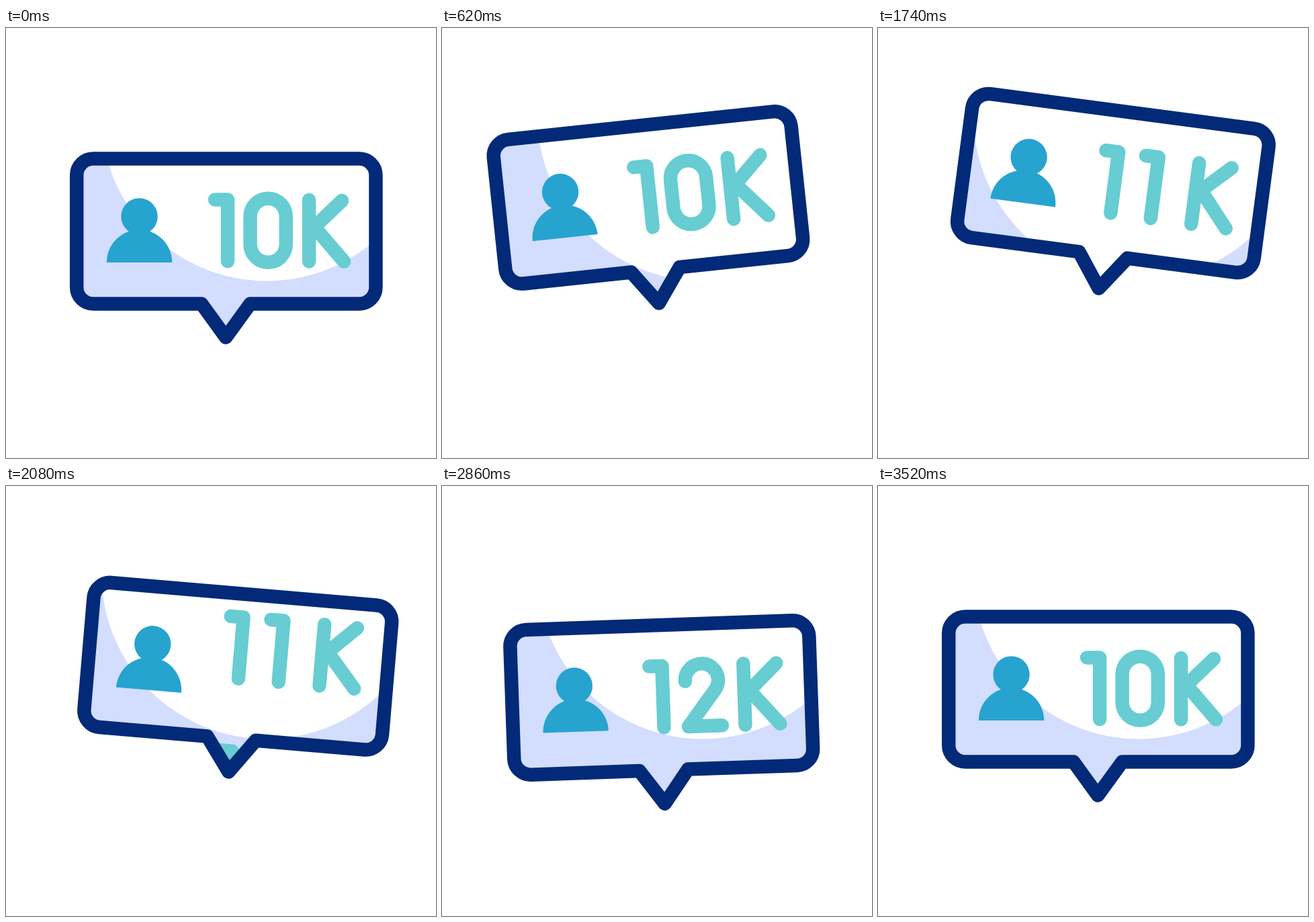
Write an HTML page with a canvas that moves like this. It is 640 px wide and 640 px high and loops after 3.6 s.

```html
<!DOCTYPE html>
<html lang="en">
<head>
<meta charset="utf-8">
<title>Follower counter</title>
<style>
  html, body { margin: 0; width: 100%; height: 100%; overflow: hidden; background: #fff; }
  canvas { display: block; width: 640px; height: 640px; }
</style>
</head>
<body>
<canvas id="stage" width="640" height="640"></canvas>
<script>
const ctx = document.getElementById('stage').getContext('2d');
const LOOP = 3600;
const STROKE = 20.5;
const NAVY = '#032a78', LAVENDER = '#d3ddfd', BLUE = '#27a3d0', TEAL = '#67cdd2';
const CENTER = { x: 328, y: 302.5 };
const ROW_HEIGHT = 200;

// time, x offset, y offset, tilt in degrees
const POSES = [
  [60, 0, 0, 0],
  [300, -3.5, -7.5, -1.1],
  [560, -18.2, -41.5, -5.3],
  [620, -20.8, -50, -6],
  [820, -32.4, -74.4, -8],
  [1100, -15, -74, -3.8],
  [1160, -11.5, -73.8, -2.7],
  [1640, 15.5, -71.5, 6.3],
  [1740, 22, -71.5, 7.5],
  [1860, 27.4, -67, 8],
  [2180, 12, -17, 2.8],
  [2380, 5, 12.7, -1.4],
  [2565, -2, 38.3, -4.5],
  [2720, -2, 23.5, -3.1],
  [2860, -1, 12.5, -2],
  [3030, -0.3, 3.5, -0.7],
  [3260, 0, 0, 0]
];

// start and end of each roll to the next number
const ROLLS = [[920, 1560], [1936, 2576], [2930, 3490]];
const ROWS = ['10', '11', '12', '10'];

const smooth = u => {
  u = Math.min(1, Math.max(0, u));
  return u * u * (3 - 2 * u);
};

function slope(i, k) {
  const a = POSES[i - 1], b = POSES[i], c = POSES[i + 1];
  if (!a || !c) return 0;
  const before = (b[k] - a[k]) / (b[0] - a[0]);
  const after = (c[k] - b[k]) / (c[0] - b[0]);
  return before * after > 0 ? 2 * before * after / (before + after) : 0;
}

function poseValue(t, k) {
  const last = POSES.length - 1;
  if (t <= POSES[0][0] || t >= POSES[last][0]) return 0;
  const i = POSES.findIndex(p => p[0] > t) - 1;
  const a = POSES[i], b = POSES[i + 1];
  const span = b[0] - a[0], u = (t - a[0]) / span, s = smooth(u);
  return a[k] * (1 - s) + b[k] * s +
    span * u * (1 - u) * ((1 - u) * slope(i, k) - u * slope(i + 1, k));
}

function line(...points) {
  points.forEach(([x, y], i) => i ? ctx.lineTo(x, y) : ctx.moveTo(x, y));
}

const GLYPHS = {
  1: () => line([311, 255.5], [330, 255.5], [330, 347]),
  0: () => ctx.roundRect(363.5, 253.7, 53.2, 95, 26.6),
  2: () => {
    ctx.moveTo(363.7, 279.5);
    ctx.arc(388.3, 278.6, 24.6, Math.PI, Math.PI * 2.21);
    line_to([366.5, 347], [416.5, 347]);
  },
  K: () => {
    line([451, 256], [451, 347.5]);
    line([500, 257], [451, 304]);
    line([461, 298.5], [503, 347.5]);
  }
};

function line_to(...points) {
  points.forEach(([x, y]) => ctx.lineTo(x, y));
}

function drawGlyph(name, shift = 0) {
  ctx.save();
  ctx.translate(shift, 0);
  ctx.beginPath();
  GLYPHS[name]();
  ctx.stroke();
  ctx.restore();
}

function drawRow(number, y) {
  ctx.save();
  ctx.translate(0, y);
  drawGlyph('1');
  drawGlyph(number[1], number[1] === '1' ? 60 : 0);
  drawGlyph('K');
  ctx.restore();
}

function bubblePath() {
  const left = 105.2, right = 550.4, top = 194.6, bottom = 410.4, r = 24.5;
  const path = new Path2D();
  path.moveTo(left + r, top);
  path.arcTo(right, top, right, bottom, r);
  path.arcTo(right, bottom, left, bottom, r);
  path.lineTo(363.5, bottom);
  path.lineTo(327.2, 460.5);
  path.lineTo(291, bottom);
  path.arcTo(left, bottom, left, top, r);
  path.arcTo(left, top, right, top, r);
  path.closePath();
  return path;
}

function fillArc(x, y, r, start, end, color) {
  ctx.fillStyle = color;
  ctx.beginPath();
  ctx.arc(x, y, r, start, end);
  ctx.fill();
}

const bubble = bubblePath();

function enterBubble(t) {
  ctx.translate(CENTER.x + poseValue(t, 1), CENTER.y + poseValue(t, 2));
  ctx.rotate(poseValue(t, 3) * Math.PI / 180);
  ctx.translate(-CENTER.x, -CENTER.y);
}

function draw(t) {
  ctx.setTransform(1, 0, 0, 1, 0, 0);
  ctx.fillStyle = '#fff';
  ctx.fillRect(0, 0, 640, 640);
  ctx.lineWidth = STROKE;
  ctx.lineCap = ctx.lineJoin = 'round';

  ctx.save();
  enterBubble(t);
  ctx.save();
  ctx.clip(bubble);
  ctx.fillStyle = LAVENDER;
  ctx.fill(bubble);

  // the white disc stays fixed to the stage while the bubble moves over it
  ctx.save();
  ctx.setTransform(1, 0, 0, 1, 0, 0);
  fillArc(388, 130.5, 246, 0, Math.PI * 2, '#fff');
  ctx.restore();

  ctx.strokeStyle = TEAL;
  const roll = ROLLS.reduce((sum, [a, b]) => sum + smooth((t - a) / (b - a)), 0);
  ROWS.forEach((number, i) => {
    if (Math.abs(i - roll) < 1.2) drawRow(number, (i - roll) * ROW_HEIGHT);
  });
  ctx.restore();

  fillArc(198.5, 280.5, 27.2, 0, Math.PI * 2, BLUE);
  fillArc(198.5, 349, 48.7, Math.PI, Math.PI * 2, BLUE);

  ctx.strokeStyle = NAVY;
  ctx.stroke(bubble);
  ctx.restore();
}

const begin = performance.now();
function frame() {
  draw((performance.now() - begin) % LOOP);
  requestAnimationFrame(frame);
}
frame();
</script>
</body>
</html>
```
